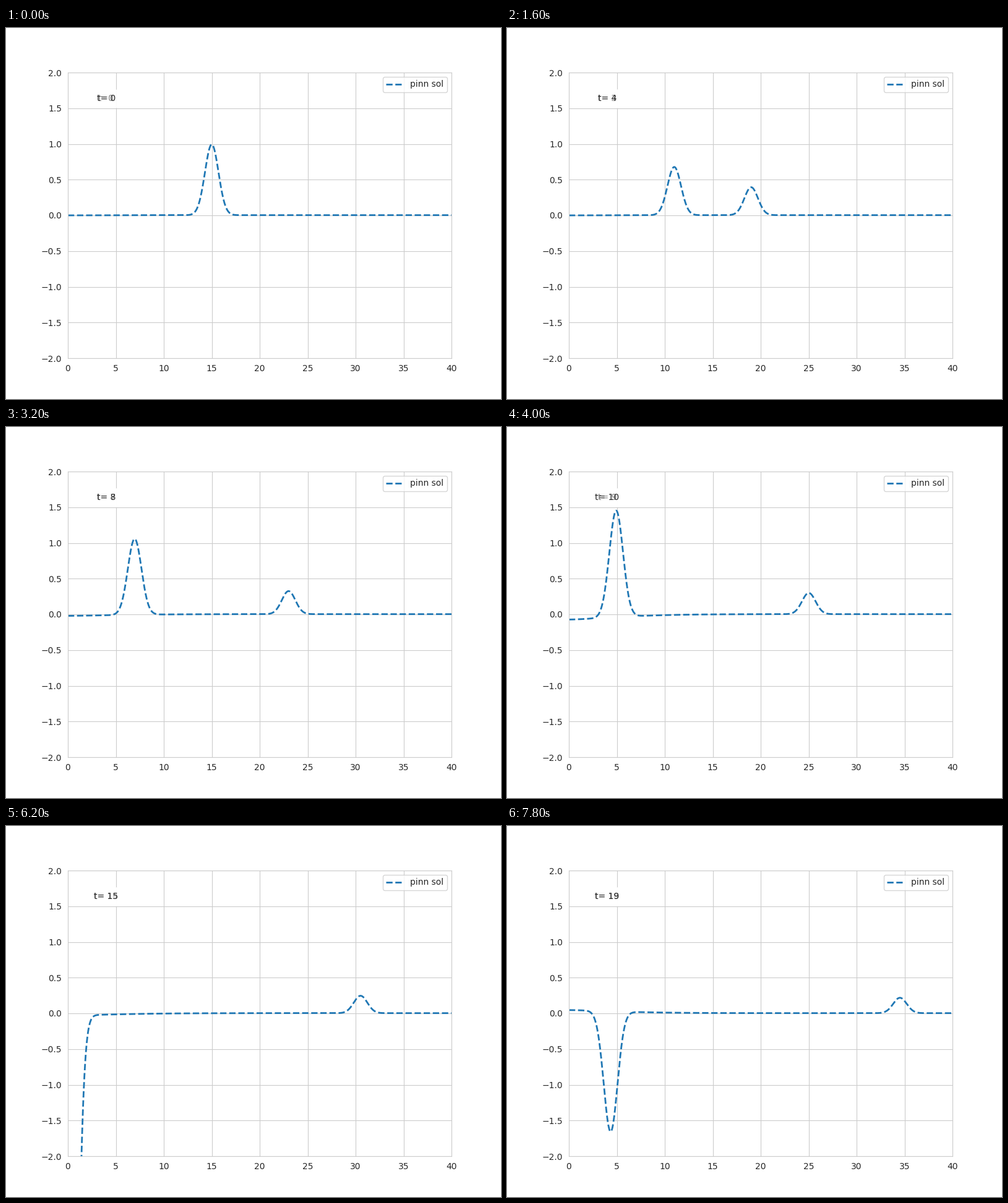
Write a matplotlib script that moves like this. It is 800 px wide and 600 px high and loops after 8000 ms.

```python
import numpy as np
import matplotlib.pyplot as plt
from matplotlib.animation import FuncAnimation

FRAMES, STEP, INTERVAL = 40, 0.5, 200
INK, GRID, BLUE = "0.15", "0.8", "#1f77b4"

plt.rcParams.update({
    "font.family": "DejaVu Sans", "font.size": 10,
    "text.color": INK, "xtick.color": INK, "ytick.color": INK,
    "axes.edgecolor": GRID, "grid.color": GRID, "axes.axisbelow": True,
})

r = np.linspace(1e-3, 40, 1000)


def bell(x, center, width):
    return np.exp(-((x - center) / width) ** 2)


def pulse(s):
    return s * bell(np.abs(s), 15, 1)


def error(t):
    """Network error: dips before the focus, rises after it, fades with r."""
    size = 0.048 * bell(t, 20, 2.6) - 0.11 * bell(t, 12, 3.1)
    fade = np.exp(-(r / 7) ** 1.5)
    return size * fade + 0.003 * (1 - fade)


def wave(t):
    """Spherical wave that runs in, inverts at r = 0 and runs out."""
    return 0.99 * (pulse(r + t) + pulse(r - t)) / (2 * r) + error(t)


fig, ax = plt.subplots(figsize=(8, 6), dpi=100)
ax.set(xlim=(0, 40), ylim=(-2, 2))
ax.grid(True, linewidth=0.8)
ax.tick_params(bottom=False, left=False)
line, = ax.plot(r, wave(0), "--", color=BLUE, lw=2, label="pinn sol")
ax.legend(loc="upper right")


def stamp(text):
    return ax.text(0.1, 0.9, text, transform=ax.transAxes, ha="center",
                   bbox={"facecolor": "w", "edgecolor": "w",
                         "alpha": 0.5, "pad": 5})


# Half-clear labels pile up, so older ones fade away underneath
for _ in range(3):
    stamp("t=0")
labels = [stamp(f"t= {int(n * STEP)}") for n in range(FRAMES)]


def update(n):
    line.set_ydata(wave(n * STEP))
    for k, label in enumerate(labels):
        label.set_visible(k <= n)
    return [line, *labels]


anim = FuncAnimation(fig, update, frames=FRAMES, interval=INTERVAL,
                     init_func=lambda: update(0), repeat=True,
                     repeat_delay=0, blit=False)
plt.show()
```
